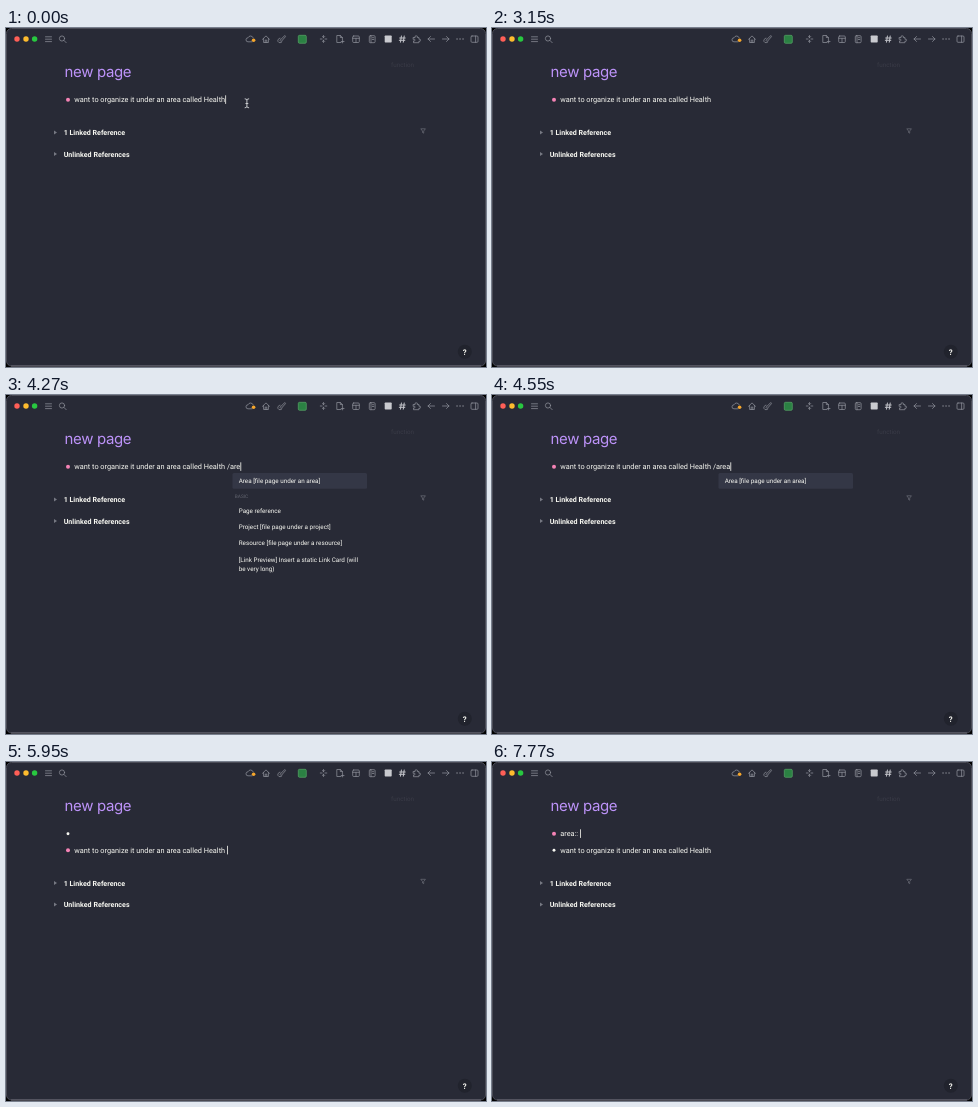
These frames come from a looping animation (480 by 339 pixels, 8000 ms). An HTML page:

```html
<!DOCTYPE html>
<html lang="en">
<head>
<meta charset="utf-8">
<title>Note editor</title>
<style>
  html, body { margin: 0; width: 100%; height: 100%; overflow: hidden; background: #000; }
  svg { display: block; width: 100vw; height: 100vh; }
  text { font-family: Roboto, sans-serif; fill: #f8f8f2; white-space: pre; text-rendering: geometricPrecision; }
  .title { font: 400 15px Inter, sans-serif; font-optical-sizing: none; letter-spacing: -.35px; fill: #bd93f9; }
  .body { font-size: 7.33px; }
  .head { font-size: 7.1px; font-weight: 700; }
  .menu text { font-size: 6.3px; }
  .menu .label { font-size: 4.8px; fill: #62646f; }
  .icons { fill: none; stroke: #8d8f98; stroke-width: .75; stroke-linecap: round; stroke-linejoin: round; }
</style>
</head>
<body>
<svg viewBox="0 0 480 339" preserveAspectRatio="none">
  <clipPath id="menuClip"><rect x="220" y="76" width="150" height="168"/></clipPath>

  <rect x=".5" y=".5" width="479" height="337.5" rx="5" fill="#282a36" stroke="#4b4c57"/>
  <path d="M5 338H475" stroke="#6d6a78"/>

  <circle cx="11" cy="11" r="2.7" fill="#ff5f57"/>
  <circle cx="20" cy="11" r="2.7" fill="#febc2e"/>
  <circle cx="28.6" cy="11" r="2.7" fill="#28c840"/>

  <g class="icons">
    <path d="M39.5 8.8h6M39.5 11.2h6M39.5 13.6h6"/>
    <circle cx="56" cy="10.5" r="2.6"/><path d="M58 12.5l2.2 2.2"/>
    <path d="M246 13.8h-4a2 2 0 0 1 0-4a2.8 2.8 0 0 1 5.2 0"/>
    <path d="M256.5 11.3l3.5-3.4l3.5 3.4M257.6 10.5v4h4.8v-4M259.2 14.5v-2.4h1.6v2.4"/>
    <path d="M278.5 7.8l-4.5 4.5l1.2 1.2l4-4.5zM274 10.2a2.3 2.3 0 1 0 2 3.6"/>
    <path d="M317.5 7.5v2.2M317.5 12.3v2.2M314.3 11h1.8M319 11h1.8M316.3 8.5l1.2 1.2l1.2-1.2M316.3 13.5l1.2-1.2l1.2 1.2"/>
    <path d="M335 14.5h-4.2v-7h3.6l2 2v2M334.3 7.5v2h2M335.2 13.5h2.8M336.6 12.1v2.8"/>
    <rect x="346.7" y="8" width="6.6" height="6.5" rx="1"/><path d="M346.7 10.3h6.6M350 10.3v4"/>
    <rect x="363.3" y="7.7" width="5.8" height="7" rx="1"/><path d="M365 7.7v7M366.3 9.7h1.5M366.3 11.5h1.5"/>
    <path d="M395.4 8l-.9 6.2M398.2 8l-.9 6.2M393.7 10h5.5M393.3 12.3h5.5" stroke="#c5c6cc" stroke-width="1"/>
    <path d="M407.5 9.5h1.6a1.2 1.2 0 1 1 2.2 0h1.6v1.7a1.1 1.1 0 1 1 0 2v1.5h-5.4v-1.8a1 1 0 1 0 0-1.7z"/>
    <path d="M428.5 11h-6.5m2.5-2.5l-2.5 2.5l2.5 2.5M436.5 11h6.5m-2.5-2.5l2.5 2.5l-2.5 2.5"/>
    <path d="M451 11h.1M454 11h.1M457 11h.1" stroke-width="1.3"/>
    <rect x="465" y="8" width="7" height="6.3" rx="1"/><path d="M469.6 8v6.3"/>
  </g>
  <circle cx="247.6" cy="12.3" r="1.8" fill="#f5a62c"/>
  <rect x="292.3" y="7.3" width="8" height="8" rx="1.2" fill="#2b8143" stroke="#58a568" stroke-width=".7"/>
  <rect x="378.7" y="7.5" width="7" height="7" rx=".7" fill="#c9cacf"/>

  <text x="385" y="38.5" font-size="6.3" style="fill:#3a3b47">function</text>
  <text class="title" x="58.5" y="49">new page</text>

  <g id="property">
    <circle class="bullet" cx="62" cy="71.8"/>
    <text class="body" x="68.3" y="74.2"></text>
  </g>
  <g id="note">
    <circle class="bullet" cx="62" cy="71.8"/>
    <text class="body" x="68.3" y="74.2"></text>
  </g>
  <rect id="caret" width=".8" height="8.6" fill="#f8f8f2"/>

  <g id="references">
    <path d="M48 102.6l3 2l-3 2zM48 124.1l3 2l-3 2z" fill="#777983"/>
    <text class="head" x="57.7" y="107.1">1 Linked Reference</text>
    <text class="head" x="57.7" y="128.6">Unlinked References</text>
    <path d="M414.8 100.8h4.6l-1.7 2.2v2.2l-1.2-.7v-1.5z" fill="none" stroke="#777983" stroke-width=".6"/>
  </g>

  <g class="menu" clip-path="url(#menuClip)"></g>

  <path id="pointer" d="M238.7 70.8q2.2 0 2.2 1.5q0-1.5 2.2-1.5M240.9 72.3v6M238.7 79.8q2.2 0 2.2-1.5q0 1.5 2.2 1.5M239.5 75.5h2.8"
        fill="none" stroke="#d5d6da" stroke-width=".9"/>

  <circle cx="458.8" cy="323.8" r="7" fill="#21232d"/>
  <text x="458.8" y="326.6" font-size="7.8" font-weight="700" text-anchor="middle">?</text>
</svg>

<script>
const LOOP = 8000, LINE = 16.5, ROW = 16.1;
const NOTE = 'want to organize it under an area called Health';
const $ = selector => document.querySelector(selector);

const row = (text, y) => `<text x="232.7" y="${y + 2.2}">${text}</text>`;
const label = y => `<text class="label" x="228.8" y="${y + 1.8}">BASIC</text>`;
const highlight = (y, width) =>
  `<rect x="226.5" y="${y - 8}" width="${width}" height="15.8" rx="1.5" fill="#343746"/>`;

const areaRow = highlight(86, 134.5) + row('Area [file page under an area]', 86);
const MENUS = {
  none: '',
  all: label(85) + highlight(100, 132) +
    ['Page reference', 'Page embed', 'Block reference', 'Block embed', 'Link',
     'Image link', 'Underline', 'Template', 'Upload an asset', 'Link']
      .map((text, i) => row(text, 100 + i * ROW)).join('') +
    '<rect x="358" y="79" width="2.6" height="24" fill="#1d1f28"/>',
  filtered: areaRow + label(101) +
    ['Page reference', 'Project [file page under a project]',
     'Resource [file page under a resource]', '[Link Preview] Insert a static Link Card (will']
      .map((text, i) => row(text, 116 + i * ROW)).join('') + row('be very long)', 173.3),
  area: areaRow
};

// Each step changes part of the state from its time (ms) onwards.
const STEPS = [
  [0, { note: NOTE, property: null, focus: 'note', caret: true, menu: 'none', pointer: true }],
  [350, { caret: false }],
  [840, { caret: true }],
  [1050, { pointer: false }],
  [1400, { caret: false }],
  [1890, { caret: true }],
  [2450, { caret: false }],
  [2590, { note: NOTE + ' ', caret: true }],
  [3150, { caret: false }],
  [3710, { caret: true }],
  [3780, { note: NOTE + ' /' }],
  [3850, { menu: 'all' }],
  [4060, { note: NOTE + ' /a' }],
  [4130, { note: NOTE + ' /ar', menu: 'filtered' }],
  [4270, { note: NOTE + ' /are' }],
  [4340, { note: NOTE + ' /area', menu: 'area' }],
  [4900, { caret: false }],
  [5390, { caret: true }],
  [5740, { note: NOTE + ' ', menu: 'none' }],
  [5950, { property: '' }],
  [6230, { property: 'area::', focus: 'property' }],
  [7070, { caret: false }],
  [7560, { caret: true }],
  [7770, { property: 'area:: ' }]
];

const show = (element, visible) => element.setAttribute('visibility', visible ? 'visible' : 'hidden');
const shift = (element, y) => element.setAttribute('transform', `translate(0 ${y})`);

function drawBlock(id, text, focused) {
  const bullet = $(`#${id} .bullet`);
  bullet.setAttribute('r', focused ? 2 : 1.45);
  bullet.setAttribute('fill', focused ? '#f583b6' : '#f8f8f2');
  $(`#${id} text`).textContent = text;
}

function draw(state) {
  const offset = state.property === null ? 0 : LINE;
  show($('#property'), state.property !== null);
  drawBlock('property', state.property ?? '', state.focus === 'property');
  drawBlock('note', state.note, state.focus === 'note');
  shift($('#note'), offset);
  shift($('#references'), offset);

  const width = $(`#${state.focus} text`).getComputedTextLength();
  $('#caret').setAttribute('x', 68.5 + width);
  $('#caret').setAttribute('y', 67.3 + (state.focus === 'note' ? offset : 0));
  show($('#caret'), state.caret);
  show($('#pointer'), state.pointer);
  $('.menu').innerHTML = MENUS[state.menu];
}

let shown = 0;
function tick() {
  const time = performance.now() % LOOP;
  const passed = STEPS.filter(([start]) => start <= time);
  if (passed.length !== shown) {
    shown = passed.length;
    draw(Object.assign({}, ...passed.map(([, change]) => change)));
  }
  requestAnimationFrame(tick);
}
tick();
</script>
</body>
</html>
```
